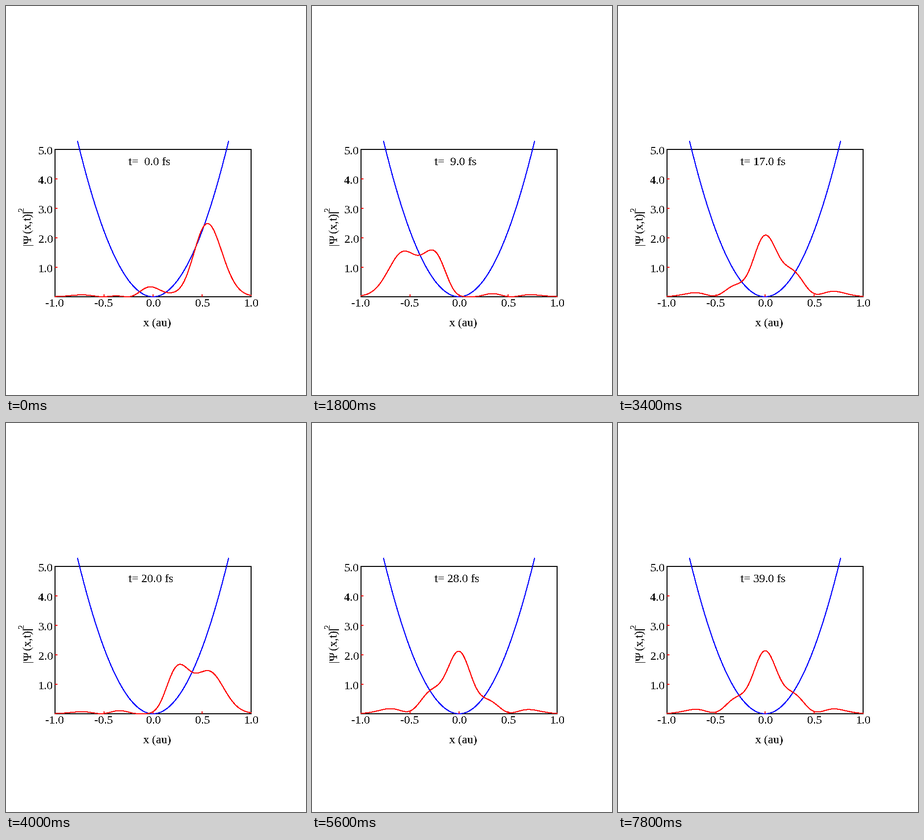
A matplotlib script that plays this animation: 612x792 px, repeating every 8000 ms.

```python
import math

import numpy as np
import matplotlib.pyplot as plt
from matplotlib.animation import FuncAnimation
from matplotlib.patches import Rectangle

W, H, DPI = 612, 792, 72
LEFT, RIGHT, TOP, BASE = 100, 500, 292, 592
X_UNIT, Y_UNIT = 200, 60

ALPHA = 12.46      # mass times angular frequency, atomic units
PERIOD = 22.24     # oscillation period in fs
START = 0.02       # time already elapsed at the first frame, fs
STATES = 5
FRAMES, INTERVAL = 40, 200

plt.rcParams["font.family"] = "Liberation Serif"
plt.rcParams["text.antialiased"] = False


def px(x):
    return 300 + X_UNIT * x


def py(y):
    return BASE - Y_UNIT * y


def eigenstates(x):
    """Harmonic oscillator states from the Hermite recurrence."""
    xi = math.sqrt(ALPHA) * x
    phi = [(ALPHA / math.pi) ** 0.25 * np.exp(-xi**2 / 2)]
    phi.append(math.sqrt(2) * xi * phi[0])
    for n in range(1, STATES - 1):
        phi.append(math.sqrt(2 / (n + 1)) * xi * phi[n]
                   - math.sqrt(n / (n + 1)) * phi[n - 1])
    return np.array(phi)


def density(t):
    """Equal mix of the lowest states, evolved to time t."""
    angle = 2 * math.pi * (t + START) / PERIOD
    phase = np.exp(-1j * angle * np.arange(STATES))
    return np.abs(phase @ PHI) ** 2 / STATES


fig = plt.figure(figsize=(W / DPI, H / DPI), dpi=DPI, facecolor="white")
ax = fig.add_axes([0, 0, 1, 1])
ax.set_xlim(0, W)
ax.set_ylim(H, 0)
ax.axis("off")


def line(x, y, color, z, lw):
    return ax.plot(x, y, color=color, lw=lw, antialiased=False,
                   solid_capstyle="butt", solid_joinstyle="round", zorder=z)[0]


def label(x, y, text, size=24, rotation=0):
    return ax.text(x, y, text, fontsize=size, color="black", ha="left",
                   va="baseline", rotation=rotation,
                   rotation_mode="anchor", zorder=6)


ax.add_patch(Rectangle((LEFT, TOP), RIGHT - LEFT, BASE - TOP, fill=False,
                       ec="black", lw=2, antialiased=False, zorder=1))

# Aliased curves fill every pixel they touch, so 1 pt shows as about 2 px.
well = np.linspace(-0.77, 0.77, 155)
line(px(well), py(8.91 * well**2), "blue", 2, 1)

grid = np.linspace(-1, 1, 401)
PHI = eigenstates(grid)
curve = line(px(grid), py(density(0)), "red", 4, 1)

for v in (-0.5, 0, 0.5):
    line([px(v)] * 2, [BASE - 5, BASE], "red", 3, 2)
for v in range(1, 5):
    line([LEFT, LEFT + 5], [py(v)] * 2, "red", 3, 2)

for v in (-1, -0.5, 0, 0.5, 1):
    label(px(v) - (20 if v < 0 else 14), 612, f"{v:.1f}")
for v in range(1, 6):
    label(66, py(v) + 10, f"{v:.1f}")

label(280, 652, "x (au)")
label(50, 487, "|Ψ", rotation=90)
label(50, 462, "(x,t)|", rotation=90)
label(36, 418, "2", size=17, rotation=90)
clock = label(250, 324, "")


def update(n):
    curve.set_ydata(py(density(n)))
    clock.set_text(f"t={n:5.1f} fs")
    return curve, clock


anim = FuncAnimation(fig, update, frames=FRAMES, interval=INTERVAL,
                     init_func=lambda: update(0), repeat=True, repeat_delay=0)
plt.show()
```
